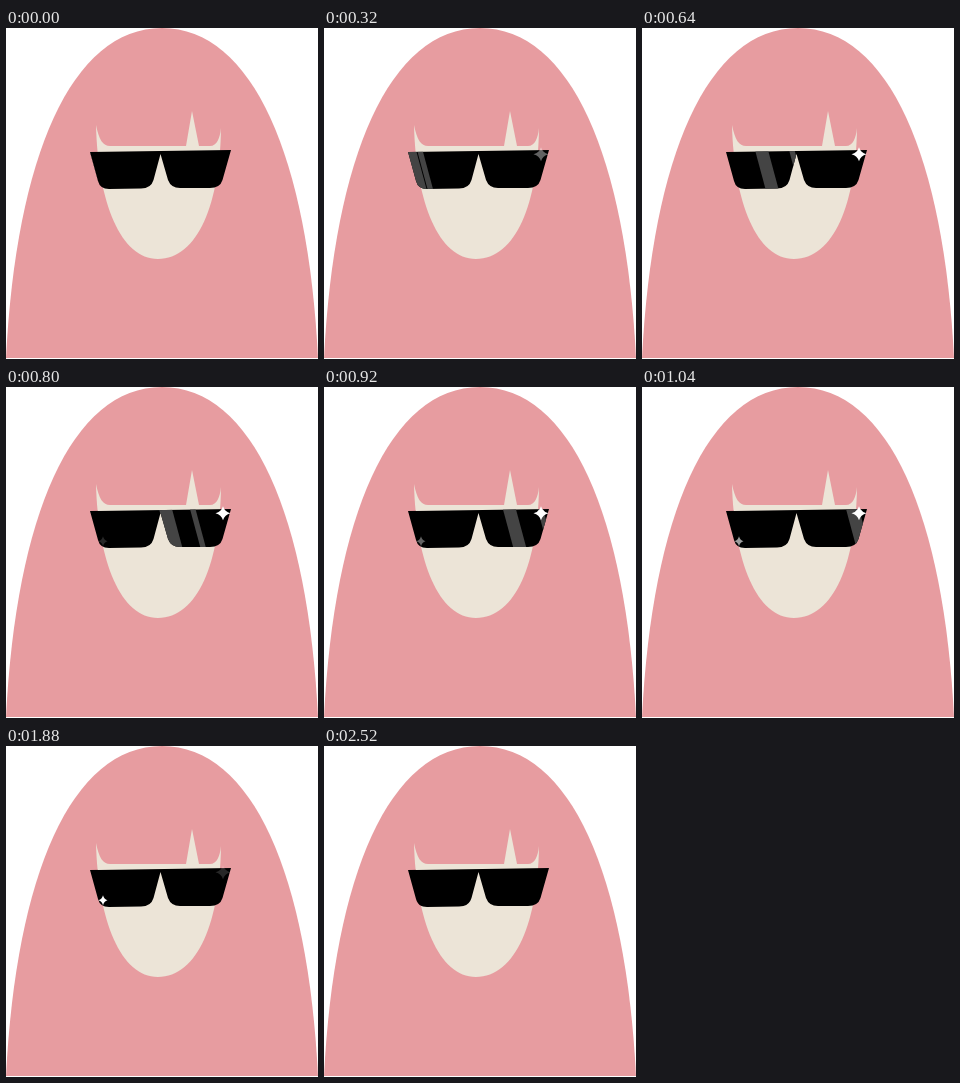
Animation of 312x331 px, one loop 2640 ms. Source, as an HTML page:

```html
<!DOCTYPE html>
<html lang="en">
<head>
<meta charset="utf-8">
<title>Sunglasses glint</title>
<style>
  html, body { margin: 0; width: 100%; height: 100%; overflow: hidden; background: #fff; }
  svg { display: block; width: 100vw; height: 100vh; }
</style>
</head>
<body>
<svg viewBox="0 0 312 331">
  <defs>
    <path id="lens" d="M84 124L225 122L216.5 152Q214 160 204 160H174Q165 160 162 152L154.5 126L147.500 152Q145 160.500 135 160.500L103 161Q94 161 92 153Z"/>
    <clipPath id="lensClip"><use href="#lens"/></clipPath>
  </defs>
  <path fill="#e79ca0" d="M0 330C10 130 65 0 156 0S302 130 312 330Z"/>
  <path fill="#ece4d7" d="M90 97C93 112 97 118 104 118H180L186 83L193 118H204C211 118 214 110 215 100C214 175 192 231 152 231C115 231 92 175 90 97Z"/>
  <use href="#lens"/>
  <g clip-path="url(#lensClip)" fill="#444">
    <path id="wide" d="M0 122H13L23.500 161H10.500Z"/>
    <path id="thin" d="M0 122H5.500L16 161H10.500Z"/>
  </g>
  <path id="right" fill="#fff"/>
  <path id="left" fill="#fff"/>
</svg>
<script>
  const LOOP = 2640, STEP = 40;
  const el = id => document.getElementById(id);
  const wide = el('wide'), thin = el('thin'), right = el('right'), left = el('left');

  // Each stripe position: [time, x]
  const widePath = [[0, 70], [320, 79], [640, 113], [800, 153], [1040, 204], [1140, 226]];
  const thinPath = [[0, 78], [320, 93], [640, 147], [800, 184], [970, 226]];

  const clamp = v => Math.min(1, Math.max(0, v));
  const ramp = (t, from, to) => clamp((t - from) / (to - from));
  const fade = (t, inA, inB, outA, outB) => ramp(t, inA, inB) * (1 - ramp(t, outA, outB));

  function slope(pts, i) {
    const a = pts[Math.max(0, i - 1)], b = pts[Math.min(pts.length - 1, i + 1)];
    return (b[1] - a[1]) / (b[0] - a[0]);
  }

  // Smooth cubic through the given points
  function along(pts, t) {
    const last = pts.length - 1;
    if (t >= pts[last][0]) return pts[last][1];
    let i = 0;
    while (t >= pts[i + 1][0]) i++;
    const [t0, x0] = pts[i], [t1, x1] = pts[i + 1];
    const d = t1 - t0, u = (t - t0) / d, v = 1 - u;
    return x0 * v * v * (1 + 2 * u) + x1 * u * u * (1 + 2 * v)
      + d * u * v * (slope(pts, i) * v - slope(pts, i + 1) * u);
  }

  function star(node, x, y, rx, ry) {
    const c = rx * 0.22;
    node.setAttribute('d', `M0 ${-ry}Q${c} ${-c} ${rx} 0Q${c} ${c} 0 ${ry}Q${-c} ${c} ${-rx} 0Q${-c} ${-c} 0 ${-ry}Z`);
    node.setAttribute('transform', `translate(${x} ${y})`);
  }

  function draw(t) {
    wide.setAttribute('transform', `translate(${along(widePath, t)} 0)`);
    thin.setAttribute('transform', `translate(${along(thinPath, t)} 0)`);
    right.setAttribute('opacity', fade(t, 120, 640, 1380, 1970));
    left.setAttribute('opacity', fade(t, 720, 1240, 1940, 2520));
  }

  star(right, 217, 126.3, 7.5, 7);
  star(left, 97, 154.3, 4.5, 5);

  const start = performance.now();
  function tick(now) {
    const t = Math.max(0, now - start) % LOOP;
    draw(Math.floor(t / STEP) * STEP);
    requestAnimationFrame(tick);
  }
  draw(0);
  requestAnimationFrame(tick);
</script>
</body>
</html>
```
